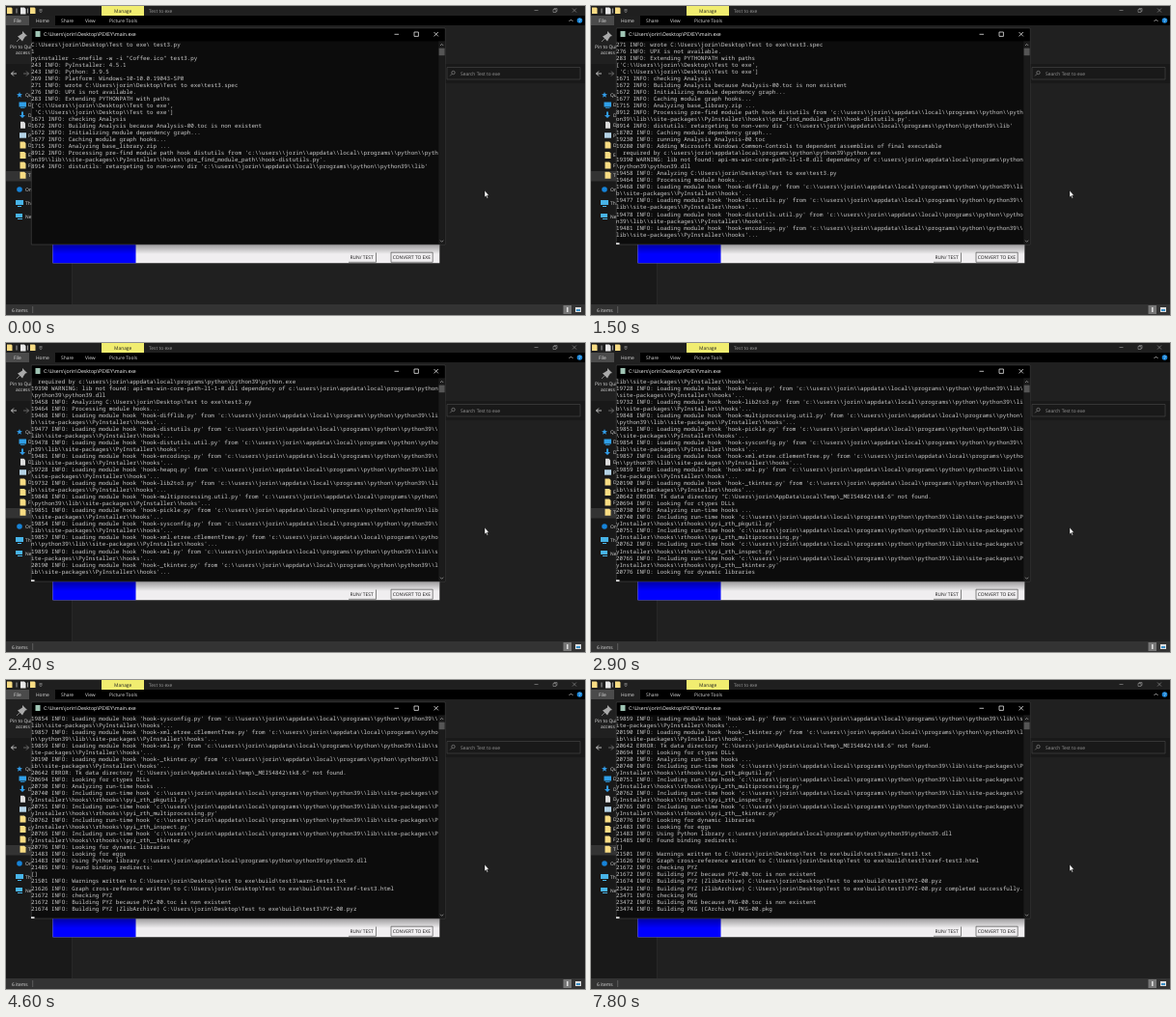
An HTML page that plays this animation: 600 by 320 pixels, repeating every 8000 ms.

```html
<!DOCTYPE html>
<html lang="en">
<meta charset="utf-8">
<title>Packaging console</title>
<style>
  html, body { margin: 0; width: 600px; height: 320px; overflow: hidden; background: #202020; }
  svg { position: absolute; left: 0; top: 0; font: 4.9px "Open Sans", sans-serif; fill: #ddd; text-rendering: geometricPrecision; }
  .line { fill: none; stroke: #ddd; stroke-width: .7; }
  .dim { stroke: #888; }
  /* 8 x 16 character cells, shown at 44 % */
  pre {
    position: absolute; left: 26px; top: 36.1px; margin: 0; width: 968px; height: 480px; overflow: hidden;
    font: 13.333px/16px "Noto Sans Mono", "DejaVu Sans Mono", monospace; color: #ccc;
    transform: scale(.4395); transform-origin: 0 0; text-rendering: geometricPrecision;
  }
  #caret { position: absolute; left: 0; width: 8px; height: 4px; background: #ddd; }
</style>
<svg width="600" height="320" viewBox="0 0 600 320">
  <linearGradient id="shade" x2="0" y2="1">
    <stop stop-opacity=".35"/>
    <stop offset="1" stop-opacity="0"/>
  </linearGradient>
  <!-- file manager: title bar, tabs, ribbon -->
  <path fill="#1f1f1f" d="M0 0H600V10H0z"/>
  <path fill="#000" d="M0 10H600V20H0z"/>
  <path fill="#f1ed70" d="M99 0H143V10H99z"/>
  <path fill="#4b4b4b" d="M0 10H24V20H0z"/>
  <path fill="#202020" d="M24 10H51V20H24zM0 20H600V60H0z"/>
  <path fill="#191919" d="M0 60H600V80H0zM0 80H69V309H0z"/>
  <path fill="#2b2b2b" d="M68 80h.8V309h-.8z"/>
  <path fill="#f8dc83" d="M1 1.500h4.500l1 1V8H1zM25 1.500h4.500l1 1V8H25z"/>
  <path fill="#e8e8e8" d="M15 1.500h4l1.500 1.500v5.500h-5.500z"/>
  <path class="line" d="M11 2.500v5M22.500 2.500v5M34.500 4h3M35 5.500l1 1 1-1"/>
  <text x="112" y="6.500" fill="#222">Manage</text>
  <text x="148" y="6.500" fill="#999">Test to exe</text>
  <text x="8" y="17">File</text>
  <text x="31" y="17">Home</text>
  <text x="57" y="17">Share</text>
  <text x="82" y="17">View</text>
  <text x="107" y="17">Picture Tools</text>
  <path class="line dim" d="M547.500 4.500h4M567 3.500h3v3h-3zM568 3.500v-1h3v3h-1M587 2.500l4 4M591 2.500l-4 4"/>
  <path class="line" d="M583.500 16l2-2 2 2"/>
  <circle cx="594.500" cy="15" r="2.800" fill="#1a86d9"/>
  <text x="593.400" y="16.800" fill="#fff">?</text>
  <path fill="#aaa" d="M17 26l5 5-2 .5-2 3-1 2-5-5 2-1 3-2z"/>
  <path class="line" style="stroke:#aaa" d="M15 33l-4 4"/>
  <text x="4" y="43.500">Pin to Quick</text>
  <text x="10" y="49.500">access</text>
  <path class="line" style="stroke:#fff" d="M11 70H5.500M8 67.500L5.500 70l2.500 2.500"/>
  <path class="line dim" d="M18 70h5.500M21 67.500l2.500 2.500-2.500 2.500"/>
  <path fill="#191919" stroke="#444" stroke-width=".7" d="M457 63.500H595V76H457z"/>
  <circle class="line dim" cx="463.500" cy="69" r="1.700"/>
  <path class="line dim" d="M462.200 70.300l-2 2"/>
  <text x="471" y="71.500" fill="#999">Search Test to exe</text>
  <!-- side list -->
  <path fill="#333" d="M0 171H68V181.500H0z"/>
  <path fill="#329ce8" d="M14 89l.8 2 2.200.2-1.700 1.400.6 2.200-1.900-1.200-1.900 1.200.6-2.200-1.700-1.400 2.200-.2z"/>
  <text x="20" y="93.700">Quick access</text>
  <g id="places"></g>
  <circle cx="14" cy="190" r="2.800" fill="#1683d8"/>
  <text x="20" y="192">On</text>
  <path fill="#48b4e8" d="M10 201h8v5h-8zM12 207h4v1h-4zM10 215h7v4h-7zM12 220h5v1h-5z"/>
  <text x="20" y="206">This PC</text>
  <text x="20" y="220">Network</text>
  <!-- status bar -->
  <path fill="#333" d="M0 309H600V320H0z"/>
  <text x="6" y="316.500">6 items</text>
  <path fill="#777" d="M27.500 311h.6v7h-.6zM577.500 310h8.500v9h-8.500z"/>
  <path fill="#ddd" d="M581 312h1.600v5H581zM590 312h6v5h-6z"/>
  <path fill="#3a8fc8" d="M591 314h4v2h-4z"/>
  <!-- converter window -->
  <path fill="#f0eef0" d="M48.500 240H449.300V266.300H48.500z"/>
  <path fill="#00f" d="M48.500 240H134.500V266.300H48.500z"/>
  <path fill="url(#shade)" d="M48.500 247H449.300V257H48.500z"/>
  <path class="line" style="stroke:#555" d="M355 265.300H383.500V255.500M399 255.200H442.200V265.300H399z"/>
  <text x="356.500" y="262" fill="#111">RUN/ TEST</text>
  <text x="400.800" y="262" fill="#111">CONVERT TO EXE</text>
  <!-- console -->
  <path fill="#0c0c0c" stroke="#484848" stroke-width=".6" d="M26.300 23H455V247H26.300z"/>
  <path fill="#000" d="M26.700 23.400H454.700V36.500H26.700z"/>
  <path fill="#9fc4b4" d="M30.500 26h5v6h-5z"/>
  <text x="39" y="31.300" font-size="5.200" fill="#fff">C:\Users\jorin\Desktop\PEXEY\main.exe</text>
  <path class="line" style="stroke:#fff" d="M402.500 29.300h4.500M423 27h4.400v4.400H423zM443.500 27l4.400 4.400M447.900 27l-4.400 4.400"/>
  <path fill="#1b1b1b" d="M448.300 36.500H454.700V246.700H448.300z"/>
  <path fill="#555" d="M448.600 43.700H454.600V51.200H448.600z"/>
  <path class="line" style="stroke:#aaa" d="M450 41l1.600-1.600 1.600 1.600M450 242.700l1.600 1.600 1.600-1.600"/>
  <path fill="#fff" stroke="#000" stroke-width=".4" d="M496 191v7l1.500-1.300 1.100 2.500 1-.5-1.100-2.400h2z"/>
</svg>
<pre><span id="log"></span><i id="caret"></i></pre>
<script>
const LOOP = 8000, STEP = 100, ROWS = 30, COLS = 120, CELL = 16;
const START = 18225; // log stamp at time 0
const CARET_OFF = [[0, 400], [4200, 4600], [6300, 6800], [7300, 7800]];

const raw = String.raw;
const python = raw`c:\users\jorin\appdata\local\programs\python\python39`;
const lib = python.replaceAll('\\', '\\\\') + raw`\\lib`;
const site = lib + raw`\\site-packages\\PyInstaller\\hooks`;
const desk = raw`C:\Users\jorin\Desktop\Test to exe`;
const desk2 = desk.replaceAll('\\', '\\\\');
const build = desk + raw`\build\test3`;

const hooks = list => list.split(' ').map(item => {
  const [ms, name] = item.split(':');
  return `${ms} INFO: Loading module hook 'hook-${name}.py' from '${site}'...`;
}).join('\n');
const runHooks = list => list.split(' ').map(item => {
  const [ms, name] = item.split(':');
  return `${ms} INFO: Including run-time hook '${site}` + raw`\\rthooks\\pyi_rth_${name}.py'`;
}).join('\n');

const log = raw`${desk}\ test3.py
1
pyinstaller --onefile -w -i "Coffee.ico" test3.py
243 INFO: PyInstaller: 4.5.1
243 INFO: Python: 3.9.5
269 INFO: Platform: Windows-10-10.0.19043-SP0
271 INFO: wrote ${desk}\test3.spec
276 INFO: UPX is not available.
283 INFO: Extending PYTHONPATH with paths
['${desk2}',
 '${desk2}']
1671 INFO: checking Analysis
1672 INFO: Building Analysis because Analysis-00.toc is non existent
1672 INFO: Initializing module dependency graph...
1677 INFO: Caching module graph hooks...
1715 INFO: Analyzing base_library.zip ...
8912 INFO: Processing pre-find module path hook distutils from '${site}\\pre_find_module_path\\hook-distutils.py'.
8914 INFO: distutils: retargeting to non-venv dir '${lib}'
18702 INFO: Caching module dependency graph...
19230 INFO: running Analysis Analysis-00.toc
19280 INFO: Adding Microsoft.Windows.Common-Controls to dependent assemblies of final executable
  required by ${python}\python.exe
19390 WARNING: lib not found: api-ms-win-core-path-l1-1-0.dll dependency of ${python}\python39.dll
19458 INFO: Analyzing ${desk}\test3.py
19464 INFO: Processing module hooks...
${hooks('19468:difflib 19477:distutils 19478:distutils.util 19481:encodings 19728:heapq 19732:lib2to3 19848:multiprocessing.util 19851:pickle 19854:sysconfig 19857:xml.etree.cElementTree 19859:xml 20190:_tkinter')}
20642 ERROR: Tk data directory "C:\Users\jorin\AppData\Local\Temp\_MEI54842\tk8.6" not found.
20694 INFO: Looking for ctypes DLLs
20730 INFO: Analyzing run-time hooks ...
${runHooks('20740:pkgutil 20751:multiprocessing 20762:inspect 20765:_tkinter')}
20776 INFO: Looking for dynamic libraries
21483 INFO: Looking for eggs
21483 INFO: Using Python library ${python}\python39.dll
21485 INFO: Found binding redirects:
[]
21501 INFO: Warnings written to ${build}\warn-test3.txt
21626 INFO: Graph cross-reference written to ${build}\xref-test3.html
21672 INFO: checking PYZ
21672 INFO: Building PYZ because PYZ-00.toc is non existent
21674 INFO: Building PYZ (ZlibArchive) ${build}\PYZ-00.pyz
23423 INFO: Building PYZ (ZlibArchive) ${build}\PYZ-00.pyz completed successfully.
23471 INFO: checking PKG
23472 INFO: Building PKG because PKG-00.toc is non existent
23474 INFO: Building PKG (CArchive) PKG-00.pkg`;

// Wrap to console rows, each with the time it is printed.
let stamp = 0;
const rows = log.split('\n').flatMap(line => {
  const found = line.match(/^(\d+) [A-Z]+:/);
  if (found) stamp = +found[1];
  const at = stamp - START;
  return line.match(new RegExp(`.{1,${COLS}}`, 'g')).map(text => ({ text, at }));
});

const byId = id => document.getElementById(id);

// Side list: icon colour and path around the row centre; the rest are folders.
const folder = ['#f8dc83', 'M14.500-3.500h4.500l1.500 1.500v5.500h-6z'];
const icons = [
  ['#2f9fe8', 'M13.500-3h7.500v5h-7.500zM15 2.500h4.500v.8H15z'],
  ['#329ce8', 'M16-3.500h2v3.500h2l-3 3-3-3h2z'],
  ['#ddd', 'M15-3.500h3.500l1.500 1.500v5.500h-5z'],
  ['#b5d3e6', 'M14-2.500h7v5.500h-7z'],
];
byId('places').innerHTML = [...'DDDPDEFT'].map((letter, i) => {
  const [fill, d] = icons[i] || folder;
  return `<g transform="translate(0 ${102.500 + i * 10.4})"><path fill="${fill}" d="${d}"/><text x="23" y="1.800">${letter}</text></g>`;
}).join('');

function draw(now) {
  const t = Math.floor(now % LOOP / STEP) * STEP;
  const shown = rows.filter(row => row.at <= t);
  const view = shown.slice(-(ROWS - 1));
  byId('log').textContent = view.map(row => row.text).join('\n');
  const caret = byId('caret').style;
  caret.top = view.length * CELL + 12 + 'px';
  caret.visibility = CARET_OFF.some(([from, to]) => t >= from && t < to) ? 'hidden' : 'visible';
  requestAnimationFrame(draw);
}
draw(performance.now());
</script>
</html>
```
